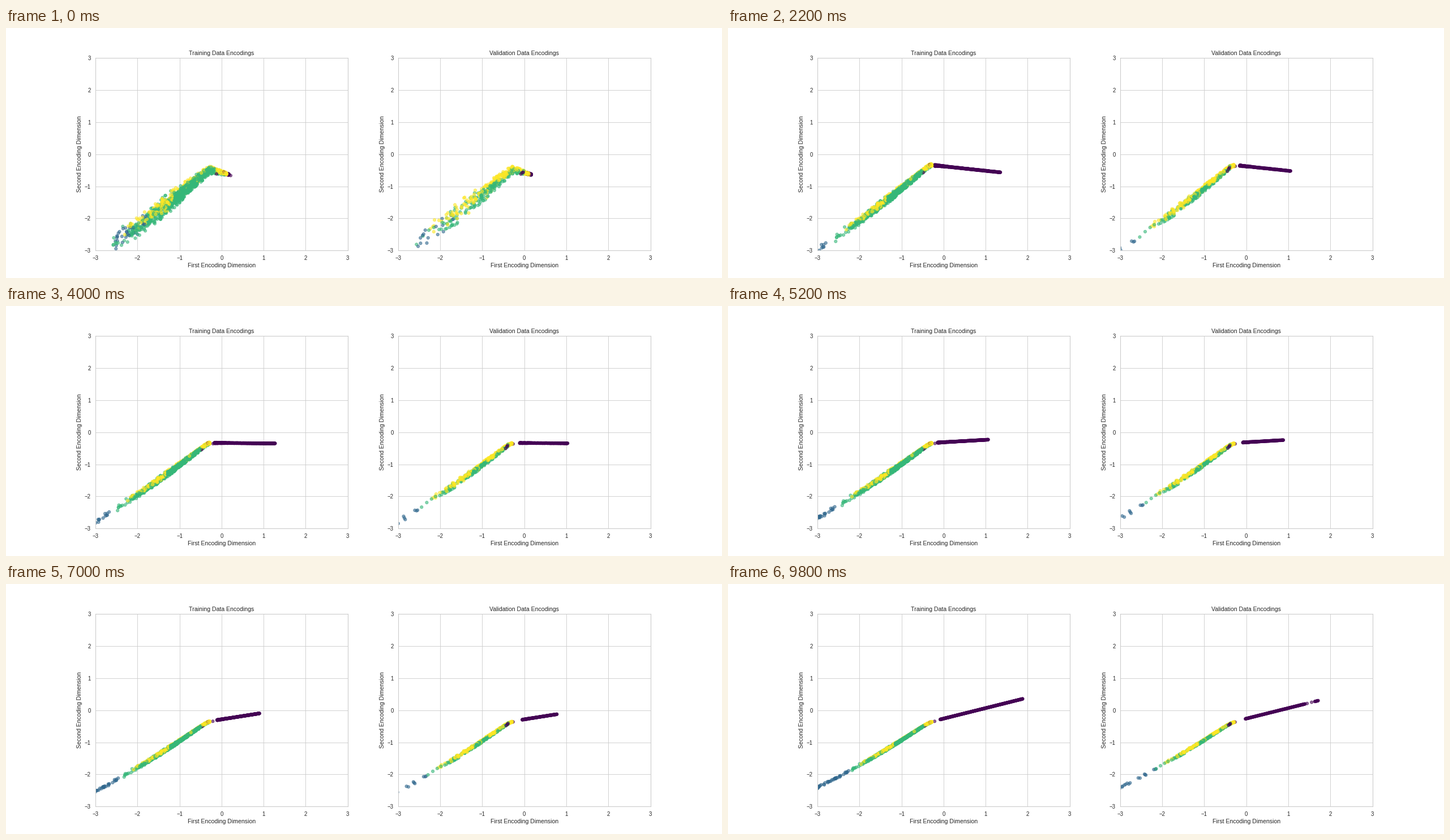
Animation, 1265 px wide and 443 px high, one loop 10000 ms. Source, as a matplotlib script:

```python
import numpy as np
import matplotlib.pyplot as plt
from matplotlib.animation import FuncAnimation

WIDTH, HEIGHT, DPI = 1265, 443, 63.25
FRAMES, INTERVAL = 50, 200

plt.rcParams.update({
    "font.family": "Liberation Sans", "text.color": ".15",
    "axes.labelcolor": ".15", "axes.edgecolor": ".8", "axes.linewidth": 1.25,
    "axes.labelsize": 12, "axes.titlesize": 12, "axes.axisbelow": True,
    "xtick.labelsize": 11, "ytick.labelsize": 11,
    "xtick.color": ".15", "ytick.color": ".15",
    "xtick.major.size": 6, "ytick.major.size": 6,
    "xtick.bottom": False, "ytick.left": False,
    "grid.color": ".8", "grid.linewidth": 1, "axes.grid": True,
})


def stages(t):
    """Fast start-up decay, slow progress, and its eased remainder."""
    progress = np.clip((t - 2200) / 7600, 0, 1)
    return np.exp(-t / 350), progress, (1 - progress) ** 1.6


def band(x, t):
    """Height of the bent band: a curved left arm meeting a straight right one."""
    early, progress, rest = stages(t)
    d = x + .4
    left = -.42 - .18 * early + (.87 + .22 * rest) * d + .04 * d ** 2
    slope = np.interp(progress, [0, .65, 1], [-.14, .215, .327]) - .2 * early
    right = -.26 - .115 * rest - .2 * early + slope * x
    sharpness = 25
    return -np.logaddexp(-sharpness * left, -sharpness * right) / sharpness


def tip_position(t):
    return np.interp(t / 1000, [0, 1, 3, 5.2, 7, 8.4, 8.8, 9.2, 9.8],
                     [.17, 1.2, 1.45, 1.06, .9, 1.7, 1.71, 2.25, 1.88])


class Encodings:
    def __init__(self, ax, counts, seed, valid):
        rng = np.random.default_rng(seed)
        arm, blue, green, yellow = counts
        self.valid = valid
        self.arm = np.linspace(0, 1, arm) ** 1.05
        label = np.repeat([0, 1, 2, 3], [5, blue, green, yellow])
        dist = np.concatenate([
            rng.uniform(-.1, .2, 5), rng.uniform(1.9, 2.8, blue),
            2.6 * rng.beta(2.2, 4.5, green), 2 * rng.beta(.9, 1.9, yellow)])

        # Neighbours of one class are stacked together, giving colour patches.
        run = 4 * np.floor((dist + 1) * 5).astype(int) + label
        order = np.argsort(rng.random(run.max() + 1)[run]
                           + rng.normal(0, .2, len(run)))
        self.label, self.dist = label[order], dist[order]
        offset = np.array([-.8, 0, -.35, .5])[self.label]
        self.wobble = np.concatenate([
            rng.uniform(-1, 1, arm),
            np.clip(rng.normal(offset, .8), -1.9, 1.9)])
        colors = np.concatenate([np.zeros(arm), self.label])
        self.dots = ax.scatter(*self.positions(0).T, c=colors, cmap="viridis",
                               vmin=0, vmax=3, alpha=.6, s=36, linewidths=1)

    def positions(self, t):
        early, progress, rest = stages(t)
        start, tip = -.08 - .14 * rest + .27 * early, tip_position(t)
        arm = self.arm
        if self.valid:
            start += .06 * (1 - early)
            tip *= .78 + .13 * progress + .2 * early
            # Late on, a small group separates near the tip.
            gap = np.interp(arm, [0, .95, .96, 1], [0, .82, .95, 1])
            arm = arm + (gap - arm) * np.clip((t - 7400) / 1000, 0, 1)
        stretch = np.where(self.label == 1, 1.25 - .27 * progress - .3 * early,
                           1.05 - .18 * progress + .2 * early)
        knee = -.28 + .4 * early
        x = np.concatenate([start + (tip - start) * arm,
                            knee - self.dist * stretch])
        spread = .017 + .04 * rest + .085 * early
        taper = np.clip((.3 - x) / 1.3, .08, 1.2)
        return np.column_stack([x, band(x, t) + self.wobble * spread * taper])

    def update(self, t):
        self.dots.set_offsets(self.positions(t))
        return self.dots


fig, axes = plt.subplots(
    1, 2, figsize=((WIDTH + .01) / DPI, (HEIGHT + .01) / DPI), dpi=DPI)
for ax, name in zip(axes, ("Training", "Validation")):
    ax.set(xlim=(-3, 3), ylim=(-3, 3), xticks=range(-3, 4), yticks=range(-3, 4),
           title=f"{name} Data Encodings", xlabel="First Encoding Dimension",
           ylabel="Second Encoding Dimension")

panels = [Encodings(axes[0], (500, 40, 750, 420), 4, False),
          Encodings(axes[1], (220, 16, 170, 230), 9, True)]


def draw(i):
    return [panel.update(i * INTERVAL) for panel in panels]


anim = FuncAnimation(fig, draw, frames=FRAMES, interval=INTERVAL,
                     repeat=True, repeat_delay=0)
plt.show()
```
